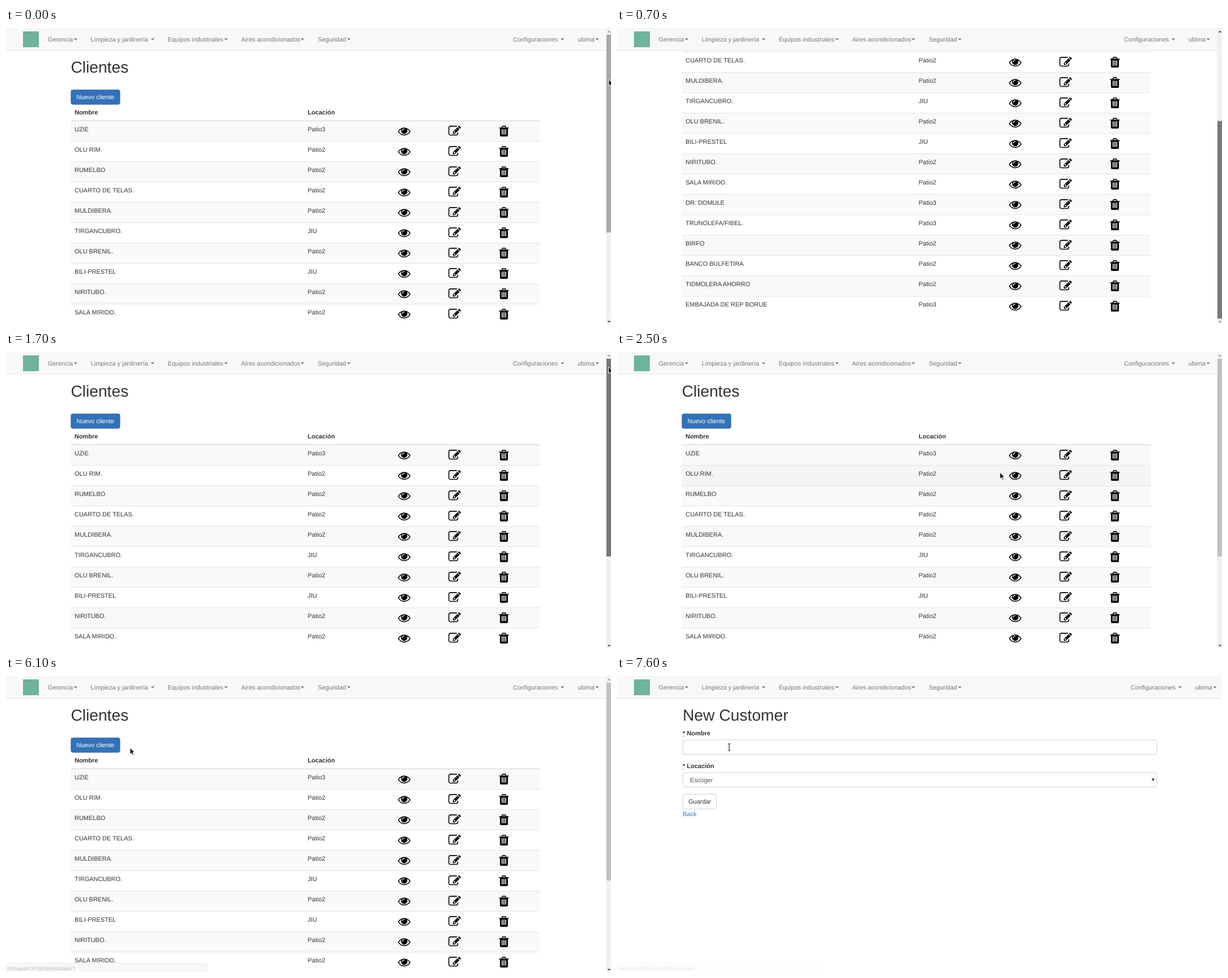
Write an HTML page that moves like this. It is 1068 px wide and 524 px high and loops after 8000 ms.

```html
<!DOCTYPE html>
<html lang="es">
<head>
<meta charset="utf-8">
<title>Clientes</title>
<style>
html, body { margin: 0; width: 100%; height: 100%; overflow: hidden; background: #fff; }
svg { display: block; width: 1068px; height: 524px; }
text { font: 10.98px "Liberation Sans", Arial, sans-serif; fill: #333; white-space: pre; text-rendering: geometricPrecision; }
.nav { fill: #777; }
.title { font-size: 28.2px; }
.bold { font-weight: bold; }
.ui { font: 9.35px "Noto Sans", sans-serif; }
</style>
</head>
<body>
<svg id="stage" viewBox="0 0 1068 524" xmlns="http://www.w3.org/2000/svg"></svg>
<script>
const LOOP = 8000, ROW = 36, TOP = 164.9, ICON = 0.784;

const clients = [
  ["UZIE", "Patio3"], ["OLU RIM.", "Patio2"], ["RUMELBO", "Patio2"],
  ["CUARTO DE TELAS.", "Patio2"], ["MULDIBERA.", "Patio2"], ["TIRGANCUBRO.", "JIU"],
  ["OLU BRENIL.", "Patio2"], ["BILI-PRESTEL", "JIU"], ["NIRITUBO.", "Patio2"],
  ["SALA MIRIDO.", "Patio2"], ["DR. DOMULE", "Patio3"], ["TRUNOLEFA/FIBEL.", "Patio3"],
  ["BIRFO", "Patio2"], ["BANCO BULFETIRA", "Patio2"], ["TIDMOLERA AHORRO", "Patio2"],
  ["EMBAJADA DE REP BORUE", "Patio3"]
];

// Stepped timelines: [start, ...values]
const scrollSteps = [[0, 0], [400, 22], [500, 105], [600, 188], [700, 230], [1500, 173], [1600, 75], [1700, 0]];
const thumbSteps = [[0, "#a8a8a8"], [400, "#787878"], [1900, "#c1c1c1"]];
const hoverSteps = [[0, -1], [2200, 0], [2300, 2], [2500, 1], [5300, 0], [5700, -1]];
const cursorSteps = [
  [0, "arrow", 1064, 91], [200, "none", 0, 0], [1500, "arrow", 1063.5, 138],
  [1600, "arrow", 1063.5, 76], [1700, "arrow", 1063.5, 26], [1900, "arrow", 1061, 69],
  [2100, "arrow", 1010, 108], [2200, "arrow", 900, 185], [2300, "arrow", 790, 243],
  [2500, "arrow", 676, 213], [5300, "hand", 878, 179.5], [5700, "arrow", 471, 126],
  [6100, "arrow", 219, 127], [6500, "hand", 183.5, 122], [7600, "beam", 198, 126]
];
const host = "silmaport:4100/entidades/";
const statusSteps = [[0, 0, "1"], [5300, 1, "1"], [6100, 0.5, "1"], [6500, 0.5, "new"], [7100, 1, "new"], [7600, 0.15, "new"]];

const at = (steps, t) => steps.filter(s => s[0] <= t).pop().slice(1);
const text = (x, y, s, cls = "", extra = "") => `<text x="${x}" y="${y}" class="${cls}" ${extra}>${s}</text>`;
const rect = (x, y, w, h, fill, extra = "") => `<rect x="${x}" y="${y}" width="${w}" height="${h}" fill="${fill}" ${extra}/>`;
const path = (d, extra = "") => `<path d="${d}" ${extra}/>`;
const group = (id, body, extra = "") => `<g id="${id}" ${extra}>${body}</g>`;
const icon = (id, x, y) => `<use href="#${id}" transform="translate(${x} ${y}) scale(${ICON})"/>`;
const menu = (x, label, caretX) => text(x, 23.6, label, "nav") + path(`M${caretX} 18.6h6.4l-3.2 3.2z`, 'fill="#777"');

const line = 'fill="none" stroke="#fff" stroke-linecap="round"';
const defs = `<defs>
  <g id="eye">
    ${path("M.3 13.9Q2.5 10.3 6.2 8.2T14 6Q18.1 6 21.8 8.2T27.7 13.9Q28.3 15 27.7 16.1Q25.5 19.7 21.8 21.8T14 24Q9.9 24 6.2 21.8T.3 16.1Q-.3 15 .3 13.9Z")}
    ${path("M26 15Q23.6 11.3 20 9.5A7 7 0 1 1 8 9.5Q4.4 11.3 2 15Q4.1 18.2 7.2 20.1T14 22Q17.7 22 20.8 20.1T26 15Z", 'fill="#fff"')}
    ${path("M14 9A4 4 0 0 0 10 13", line + ' stroke-width="1.5"')}
  </g>
  <g id="edit">
    ${path("M19.4 3.2Q18.5 3 17.5 3H4.5A3.5 3.5 0 0 0 1 6.5V19.5A3.5 3.5 0 0 0 4.5 23H17.5A3.5 3.5 0 0 0 21 19.5V16.8", 'fill="none" stroke="#000" stroke-width="2"')}
    ${path("M20.5 5L25 9.5 14.5 20H10V15.5ZM21.5 4L22.9 2.6Q24 1.6 25 2.6L27.4 4.9Q28.4 6 27.4 7.1L26 8.5Z")}
    ${path("M13.9 18.5l1.8-1.8-2.4-2.4-1.8 1.8v.9H13v1.5z", 'fill="#fff"')}
    ${path("M20.5 7.5L15 13", line + ' stroke-width=".6"')}
  </g>
  <g id="trash">
    ${path("M3.5 6H8.3L9.4 3.4Q10 2 11.5 2H16.5Q18 2 18.6 3.4L19.7 6H24.5Q25 6 25 6.5V7.5Q25 8 24.5 8H23V22.8Q23 26 20.5 26H7.5Q5 26 5 22.8V8H3.5Q3 8 3 7.5V6.5Q3 6 3.5 6ZM10.5 6H17.5L16.8 4.2 16.5 4H11.5L11.2 4.2Z", 'fill-rule="evenodd"')}
    ${[9, 13, 17].map(x => rect(x, 10, 2, 12, "#fff", 'rx=".5"')).join("")}
  </g>
</defs>`;

const row = ([name, place], i) => {
  const y = TOP + i * ROW;
  return rect(114.4, y, 828, ROW, "", `class="row"`)
    + (i ? rect(114.4, y - 0.5, 828, 0.8, "#ddd") : "")
    + text(121, y + 18.2, name) + text(532.5, y + 18.2, place)
    + icon("eye", 692, y + 6.6) + icon("edit", 781, y + 6.6) + icon("trash", 868, y + 6.6);
};

const listPage = text(114.4, 79.3, "Clientes", "title")
  + rect(114.8, 109.4, 86.3, 25.8, "#3272b8", 'id="newButton" rx="3" stroke="#2e69a6" stroke-width=".8"')
  + text(124.5, 126, "Nuevo cliente", "", 'id="newLabel"')
  + text(121, 153.4, "Nombre", "bold") + text(532.5, 153.4, "Locación", "bold")
  + clients.map(row).join("")
  + rect(114.4, 163.5, 828, 1.5, "#ddd");

const field = 'rx="3" stroke="#ccc" stroke-width=".9"';
const required = (y, label) => text(116, y, "* " + label, "bold")
  + path(`M116 ${y + 2.2}h4`, 'stroke="#777" stroke-width=".9" stroke-dasharray="1 .6"');
const formPage = text(116, 79.3, "New Customer", "title")
  + required(104.8, "Nombre") + rect(116.3, 113, 836.7, 25.8, "#fff", field)
  + required(162.8, "Locación") + rect(116.3, 171, 836.7, 25.8, "#fff", field)
  + text(129, 187.9, "Escoger", "", 'style="fill:#555"') + path("M943.8 181.4h5.2l-2.6 5z", 'fill="#333"')
  + rect(116.3, 209.2, 59.4, 26.2, "#fff", field) + text(126, 226.3, "Guardar")
  + text(116, 247.5, "Back", "", 'style="fill:#337ab7"');

const navBar = rect(0, 0, 1068, 40, "#f8f8f8") + rect(0, 39.2, 1068, 0.8, "#e7e7e7")
  + rect(30, 6, 28, 28, "#6fb39a")
  + menu(73.7, "Gerencia", 119.6) + menu(149.6, "Limpieza y jardinería", 255.5)
  + menu(285.4, "Equipos industriales", 385) + menu(415, "Aires acondicionados", 520)
  + menu(550.4, "Seguridad", 602)
  + group("account", menu(895, "Configuraciones", 979) + menu(1009, "ubima", 1040.4));

const scrollBar = rect(1059.2, 0, 9, 524, "#f1f1f1") + rect(1060, 12, 8, 350, "", 'id="thumb"')
  + path("M1061.6 7.8h6l-3-3.2z", 'id="upArrow"') + path("M1061.6 518.6h6l-3 3.2z", 'id="downArrow"');

const tooltip = rect(885.4, 192.6, 48.6, 20.4, "#000")
  + text(891, 206.2, "Eliminar", "ui", 'style="fill:#fff;font-size:9.6px"');

const statusBar = path("M-1 525V508.6H352.5Q354.8 508.6 354.8 511V525Z", 'fill="#f2f2f2" stroke="#c8c8c8" stroke-width=".8"')
  + text(1.5, 520.6, "", "ui", 'id="address" style="fill:#6e6e6e"');

const outline = 'stroke-width=".9" stroke-linejoin="round"';
const cursors = group("arrow", path("M0 0V11.6L2.7 9.2 4.6 13.4 6.5 12.5 4.7 8.5H8Z", `fill="#111" stroke="#fff" ${outline}`))
  + group("hand", path("M-1.2 6.8V1.2A1.2 1.2 0 0 1 1.2 1.2V5L5 5.7Q6.6 6 6.4 7.8L5.6 11.8V13.6H-.4L-4 8.6Q-4.4 6.9-2.6 7.2L-1.2 8.4ZM1.2 5V7.6M3.2 5.5V7.7M5 5.8V8", `fill="#fff" stroke="#000" ${outline}`))
  + group("beam", path("M-2.4-6H-.6L0-5.4.6-6H2.4M0-5.4V5.4M-2.4 6H-.6L0 5.4.6 6H2.4", 'fill="none" stroke="#222" stroke-width="1.2"'));

const stage = document.getElementById("stage");
stage.innerHTML = defs + rect(0, 0, 1068, 524, "#fff")
  + group("list", listPage) + group("form", formPage) + navBar
  + group("scrollBar", scrollBar) + group("tooltip", tooltip)
  + group("status", statusBar) + cursors;

const $ = id => document.getElementById(id);
const set = (id, name, value) => $(id).setAttribute(name, value);
const show = (id, on) => set(id, "visibility", on ? "visible" : "hidden");
const rows = [...stage.querySelectorAll(".row")];

function draw(t) {
  const onForm = t >= 7600;
  const [scroll] = at(scrollSteps, t);
  const [hovered] = at(hoverSteps, t);
  const [opacity, page] = at(statusSteps, t);
  const [shape, x, y] = at(cursorSteps, t);
  const onButton = t >= 6500;

  show("list", !onForm);
  show("form", onForm);
  show("scrollBar", !onForm);
  show("tooltip", t >= 5300 && t < 5700);
  set("account", "transform", `translate(${onForm ? 11.8 : 0} 0)`);
  set("list", "transform", `translate(0 ${-scroll})`);

  set("thumb", "y", 12 + scroll * 0.663);
  set("thumb", "fill", at(thumbSteps, t)[0]);
  set("upArrow", "fill", scroll > 0 ? "#505050" : "#a3a3a3");
  set("downArrow", "fill", scroll < 230 ? "#505050" : "#a3a3a3");

  rows.forEach((r, i) => r.setAttribute("fill", i === hovered ? "#f5f5f5" : i % 2 ? "#fff" : "#f9f9f9"));
  set("newButton", "fill", onButton ? "#28588f" : "#3272b8");
  set("newButton", "stroke", onButton ? "#204d78" : "#2e69a6");
  $("newLabel").style.fill = onButton ? "#333" : "#fff";

  set("status", "opacity", opacity);
  $("address").textContent = host + page;

  for (const id of ["arrow", "hand", "beam"]) show(id, id === shape);
  if (shape !== "none") set(shape, "transform", `translate(${x} ${y})`);
}

const start = performance.now();
function tick() {
  draw((performance.now() - start) % LOOP);
  requestAnimationFrame(tick);
}
tick();
</script>
</body>
</html>
```
